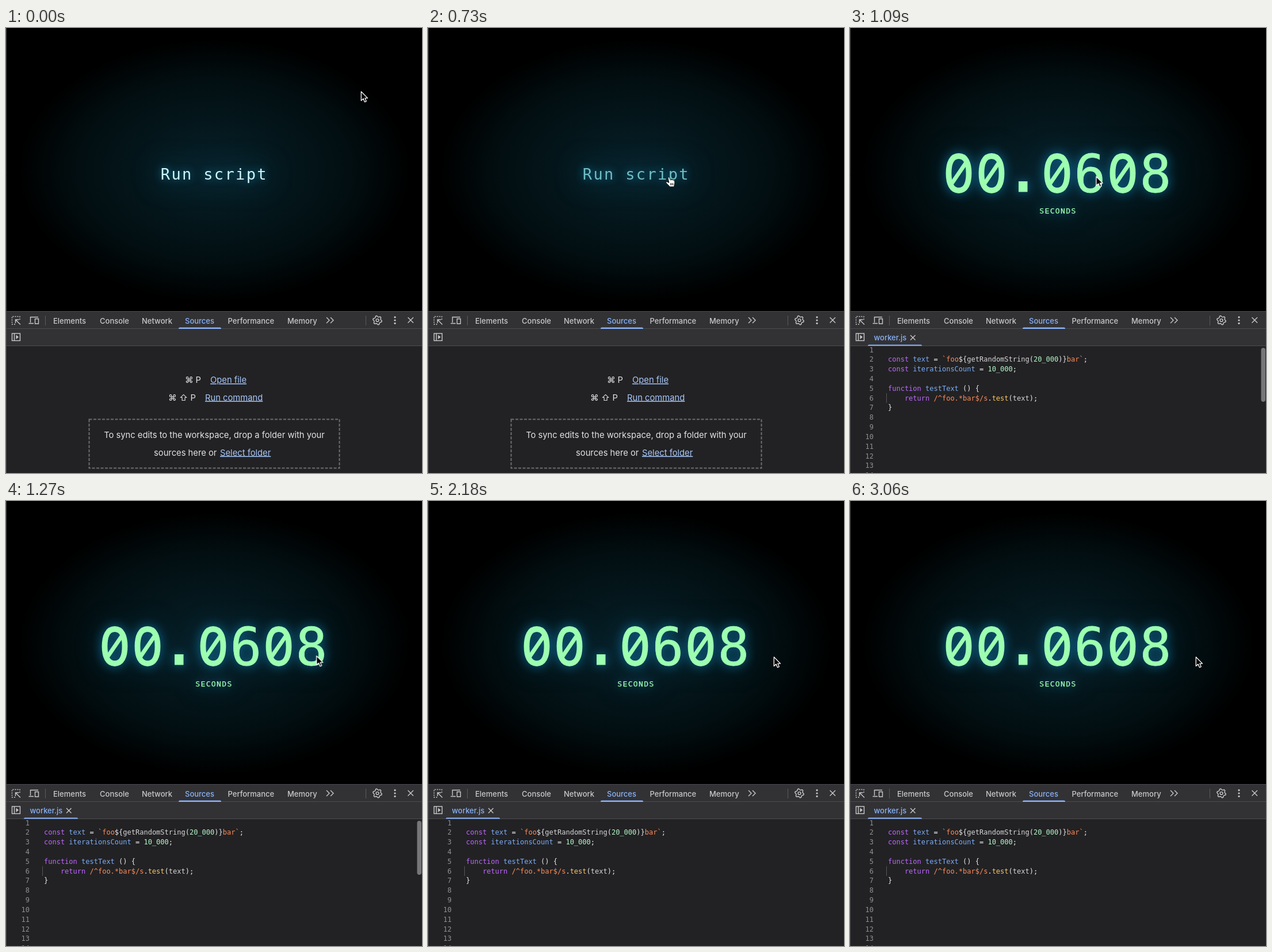
Recreate the animation shown at these times as an HTML page. Size 723x775 px, loop 3090 ms.

```html
<!DOCTYPE html>
<html lang="en">
<head>
<meta charset="utf-8">
<title>Run script</title>
<style>
  html, body { margin: 0; width: 100%; height: 100%; overflow: hidden; background: #000; }
  svg { display: block; width: 723px; height: 775px; }
  text { white-space: pre; }
  .ui { font: 500 13px Inter, "DejaVu Sans", sans-serif; fill: #c9c9cb; }
  .body { font: 400 14.75px Inter, "DejaVu Sans", sans-serif; fill: #e3e3e5; }
  .mono { font-family: "DejaVu Sans Mono", "Liberation Mono", monospace; }
  .code { font-size: 12px; fill: #e8e8ea; }
  .link { fill: #a8c7fa; text-decoration: underline; }
  .blue { fill: #8ab4f8; }
  .icon { fill: none; stroke: #c9c9cb; stroke-width: 1.4; }
  .kw { fill: #bf67ff; } .def { fill: #7cacf8; } .str { fill: #fe8d59; }
  .num { fill: #b4f8c8; } .prop { fill: #fdc85f; } .var { fill: #d6d6d8; }

  .loop, .loop * { animation-duration: 3090ms; animation-iteration-count: infinite; }

  #button {
    font-size: 27px; letter-spacing: 2.35px; transform-origin: 0 254px;
    filter: drop-shadow(0 0 7px #117a9c) drop-shadow(0 0 24px #0b5068);
    animation-name: button;
  }
  @keyframes button {
    0%, 16% { fill: #d0f8fb; transform: none; opacity: 1; }
    20.5%, 27.5% { fill: #72bec6; transform: none; opacity: 1; }
    29%, 99.99% { fill: #72bec6; transform: scaleY(0); opacity: 0; }
    100% { fill: #d0f8fb; transform: none; opacity: 1; }
  }

  #counter {
    transform-origin: 0 253px;
    filter: drop-shadow(0 0 9px #0f6a92) drop-shadow(0 0 18px #083f5880);
    animation-name: counter; animation-timing-function: linear;
  }
  #counter text, #counter rect { fill: currentColor; }
  #digits text { stroke: currentColor; stroke-width: .8; }
  #counter .unit { stroke: currentColor; stroke-width: .25; }
  @keyframes counter {
    0%, 28.5% { color: #fff0; transform: scaleY(0); }
    31.39% { color: rgba(225, 245, 245, .37); transform: scaleY(.723); }
    35.3%, 100% { color: #9dfeb0; transform: none; }
  }

  #cursor { animation-name: move; }
  @keyframes move {
    0%, 1.5% { transform: translate(617px, 110px); animation-timing-function: ease-in-out; }
    20%, 33% { transform: translate(418px, 257px); animation-timing-function: cubic-bezier(.5, 0, .8, .7); }
    41.1% { transform: translate(539px, 269px); animation-timing-function: ease-out; }
    49%, 100% { transform: translate(601px, 271px); }
  }
  #arrow { animation-name: arrow; animation-timing-function: step-end; }
  #hand { animation-name: hand; animation-timing-function: step-end; }
  @keyframes arrow { 0% { opacity: 1; } 16% { opacity: 0; } 27.5%, 100% { opacity: 1; } }
  @keyframes hand { 0% { opacity: 0; } 16% { opacity: 1; } 27.5%, 100% { opacity: 0; } }

  #empty { animation-name: leave; animation-timing-function: step-end; }
  #file { animation-name: enter; animation-timing-function: step-end; }
  #thumb { animation-name: fade; animation-timing-function: linear; }
  @keyframes leave { 0% { opacity: 1; } 27.5%, 100% { opacity: 0; } }
  @keyframes enter { 0% { opacity: 0; } 27.5%, 100% { opacity: 1; } }
  @keyframes fade { 0%, 45% { opacity: 1; } 52%, 100% { opacity: 0; } }
</style>
</head>
<body>
<svg class="loop" viewBox="0 0 723 775" xmlns="http://www.w3.org/2000/svg">
  <defs>
    <radialGradient id="haze">
      <stop offset="0" stop-color="#07202a"/>
      <stop offset=".4" stop-color="#04161b"/>
      <stop offset=".7" stop-color="#020e11"/>
      <stop offset="1" stop-color="#000"/>
    </radialGradient>
    <clipPath id="pane"><rect y="554" width="723" height="221"/></clipPath>
    <g id="zero" fill="none" stroke="currentColor">
      <path stroke-width="9.8" d="M0-30C12-30 17.5-18 17.5 0S12 30 0 30-17.5 18-17.5 0-12-30 0-30Z"/>
      <path stroke-width="7" d="M-13 19L13-19"/>
    </g>
  </defs>

  <!-- page -->
  <rect width="723" height="493"/>
  <ellipse cx="362" cy="248" rx="340" ry="228" fill="url(#haze)"/>
  <text id="button" class="mono" x="268.8" y="263.5">Run script</text>
  <g id="counter" class="mono">
    <g id="digits" font-size="91"></g>
    <text class="unit" x="329.2" y="323" font-size="13" letter-spacing="1.4">SECONDS</text>
  </g>

  <!-- developer tools -->
  <rect y="493" width="723" height="282" fill="#222224"/>
  <rect y="493" width="723" height="60" fill="#323235"/>
  <path stroke="#4c4c50" d="M0 493.5H723M0 523.5H723M0 553.5H723"/>
  <path stroke="#5a5a5e" d="M68.5 501V518M625.5 501V518"/>
  <g class="ui">
    <text x="82" y="514.5">Elements</text>
    <text x="163" y="514.5">Console</text>
    <text x="236" y="514.5">Network</text>
    <text x="311" y="514.5" class="blue">Sources</text>
    <text x="385.5" y="514.5">Performance</text>
    <text x="489" y="514.5">Memory</text>
  </g>
  <path class="blue" d="M300 524V523.5Q300 521.5 302 521.5H372Q374 521.5 374 523.5V524Z"/>
  <g class="icon">
    <path stroke-dasharray="2 2" d="M24 508V502.5H10.5V516H16"/>
    <path d="M25 516.5L17 508.5M16.5 514V508H22.5"/>
    <path d="M56 503.5H42.5V513M39.5 514.5H48M50.5 506.5H56.5V515H50.5Z"/>
    <path d="M557 504L562 509L557 514M564 504L569 509L564 514"/>
    <path d="M698.5 504L708 513.5M708 504L698.5 513.5"/>
    <rect x="10.5" y="532" width="14" height="12.5"/>
    <path d="M14.5 532V544.5"/>
    <path fill="#c9c9cb" stroke="none" d="M17.5 534.5L22 538.2L17.5 542Z"/>
    <path id="gear" stroke-linejoin="round"/>
    <circle cx="645.5" cy="509" r="2.4"/>
  </g>
  <g fill="#c9c9cb">
    <circle cx="676" cy="503.7" r="1.6"/>
    <circle cx="676" cy="509" r="1.6"/>
    <circle cx="676" cy="514.3" r="1.6"/>
  </g>

  <g id="empty">
    <g class="body">
      <text x="311" y="618">⌘</text>
      <text x="329.5" y="618">P</text>
      <text x="355" y="618" class="link">Open file</text>
      <text x="282" y="648.5">⌘</text>
      <text x="301" y="648.5">⇧</text>
      <text x="320.5" y="648.5">P</text>
      <text x="346" y="648.5" class="link">Run command</text>
      <text x="362" y="714" text-anchor="middle">To sync edits to the workspace, drop a folder with your</text>
      <text x="257" y="744.5">sources here or</text>
      <text x="372" y="744.5" class="link">Select folder</text>
    </g>
    <rect x="144.5" y="681.5" width="435" height="85" fill="none" stroke="#6d6d70" stroke-width="2" stroke-dasharray="5 2.5"/>
  </g>

  <g id="file">
    <text class="ui blue" x="41.5" y="544">worker.js</text>
    <path class="icon" d="M105 535L113.500 543.500M113.500 535L105 543.500"/>
    <path class="blue" d="M31 553.500V553Q31 551.500 33 551.500H123Q125 551.500 125 553V553.500Z"/>
    <g clip-path="url(#pane)">
      <g id="numbers" class="mono" font-size="12" fill="#909094" text-anchor="end"></g>
      <g class="mono code">
        <text x="66" y="581.3"><tspan class="kw">const</tspan> <tspan class="def">text</tspan> = <tspan class="str">`foo</tspan>${<tspan class="var">getRandomString</tspan>(<tspan class="num">20_000</tspan>)}<tspan class="str">bar`</tspan>;</text>
        <text x="66" y="598.1"><tspan class="kw">const</tspan> <tspan class="def">iterationsCount</tspan> = <tspan class="num">10_000</tspan>;</text>
        <text x="66" y="631.8"><tspan class="kw">function</tspan> <tspan class="def">testText</tspan> () {</text>
        <text x="94.9" y="648.6"><tspan class="kw">return</tspan> <tspan class="str">/^foo.*bar$/s</tspan>.<tspan class="prop">test</tspan>(<tspan class="var">text</tspan>);</text>
        <text x="66" y="665.4">}</text>
      </g>
      <path stroke="#56565a" d="M63.5 636V653"/>
      <rect id="thumb" x="714.5" y="557" width="7.5" height="94" rx="3.7" fill="#77777a"/>
    </g>
  </g>
  <path stroke="#47474a" d="M.5 0V775"/>

  <g id="cursor">
    <path id="arrow" stroke="#fff" stroke-width="1.3" stroke-linejoin="round" d="M.3 .8V16.5L4 13.1L6.400 18.800L9.200 17.600L6.800 12.100H11.500Z"/>
    <g id="hand" stroke="#000" stroke-width=".9" stroke-linejoin="round">
      <path fill="#fff" d="M-1 3.500Q0 1.800 1.500 3.200L3.300 8Q4.600 6.300 5.800 7.700Q7.200 6.400 8.300 8Q10.300 7.300 10.600 9.600Q11.400 13 10.200 15.800L9.700 19.500H2.300Q0 16.800-2.300 14.500L-4.400 12.200Q-4.500 10.300-2.500 10.800L.8 12.500Z"/>
      <path fill="none" d="M3.600 13V17M5.700 13V17M7.800 13V17"/>
    </g>
  </g>
</svg>
<script>
  const NS = "http://www.w3.org/2000/svg";
  const byId = id => document.getElementById(id);

  function add(parent, tag, attrs, content = "") {
    const el = document.createElementNS(NS, tag);
    for (const name in attrs) el.setAttribute(name, attrs[name]);
    el.textContent = content;
    parent.append(el);
  }

  // The slashed zeros and the square point are drawn; the other digits are type.
  const digits = byId("digits");
  [..."00.0608"].forEach((char, i) => {
    const x = 189 + 57 * i;
    if (char === "0") add(digits, "use", { href: "#zero", x, y: 253 });
    else if (char === ".") add(digits, "rect", { x: x - 10, y: 267, width: 15.5, height: 18.5 });
    else add(digits, "text", { x, y: 286, "text-anchor": "middle" }, char);
  });

  for (let n = 1; n <= 14; n++) {
    add(byId("numbers"), "text", { x: 41, y: 564.5 + 16.82 * (n - 1) }, n);
  }

  const teeth = [];
  for (let i = 0; i < 24; i++) {
    const angle = (i + .5) * Math.PI / 12;
    const r = i % 4 < 2 ? 6 : 7.8;
    teeth.push(`${645.5 + r * Math.sin(angle)} ${509 - r * Math.cos(angle)}`);
  }
  byId("gear").setAttribute("d", `M${teeth.join("L")}Z`);
</script>
</body>
</html>
```
